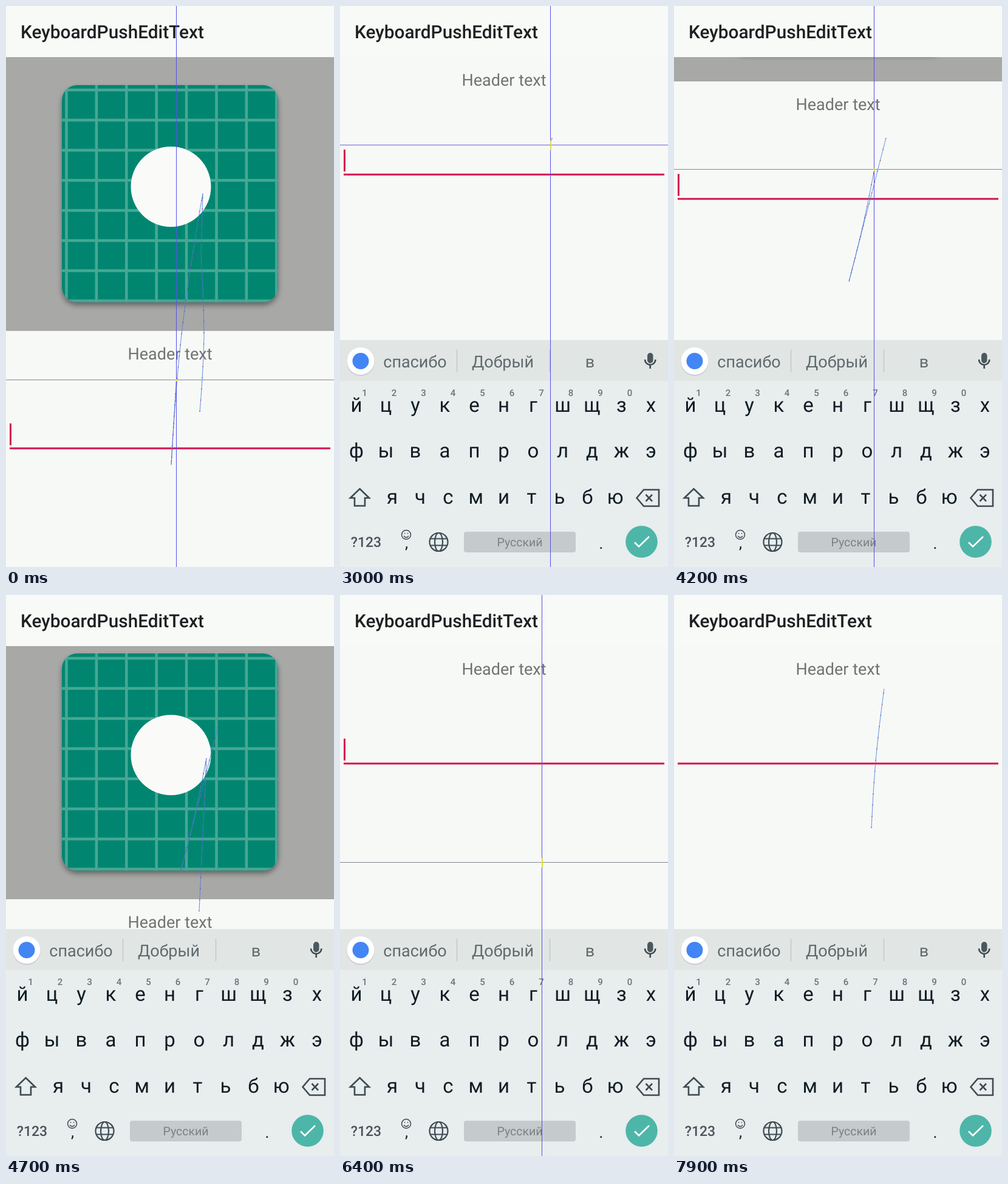
These frames come from a looping animation (540x922 px, 8 s). An HTML page:

```html
<!DOCTYPE html>
<html lang="en">
<head>
<meta charset="utf-8">
<title>Keyboard push demo</title>
<style>
  html, body { margin: 0; width: 100%; height: 100%; overflow: hidden; background: #f7f9f7; }
  svg {
    display: block; width: 100vw; height: 100vh;
    font-family: Roboto, "Noto Sans", sans-serif; text-rendering: geometricPrecision;
  }
  .title { font-size: 29.8px; font-weight: 500; fill: #1e2021; }
  .header { font-size: 27px; fill: #717372; }
  .mid { text-anchor: middle; }
  .hint { font-size: 27px; fill: #616a6c; }
  .key { font-size: 33px; fill: #101d24; }
  .small { font-size: 26px; }
  .digit { font-size: 15px; font-weight: 500; fill: #697476; }
  .icon { fill: none; stroke: #3d4b52; stroke-width: 2.6; }
  .trail { fill: none; stroke: #4a7ee0; stroke-width: 1; stroke-opacity: .85; }
  .dots { fill: none; stroke: #a0285c; stroke-width: 1.2; stroke-dasharray: 1.5 17; }
  .cross { stroke-width: 1; shape-rendering: crispEdges; }
</style>
</head>
<body>
<svg viewBox="0 0 540 922" preserveAspectRatio="none">
  <defs>
    <filter id="shade" x="-10%" y="-10%" width="120%" height="120%">
      <feGaussianBlur stdDeviation=".7" result="soft"/>
      <feDropShadow in="soft" dx="0" dy="5" stdDeviation="4" flood-color="#000" flood-opacity=".4"/>
    </filter>
    <clipPath id="tile"><rect x="92" y="130" width="356" height="357" rx="25"/></clipPath>
  </defs>
  <rect width="540" height="922" fill="#f7f9f7"/>

  <g id="content">
    <rect y="84" width="540" height="450" fill="#a8a8a7"/>
    <g filter="url(#shade)">
      <g clip-path="url(#tile)">
        <rect x="92" y="130" width="356" height="357" fill="#02866f"/>
        <path id="grid" stroke="#fff" stroke-opacity=".27" stroke-width="4.500"/>
      </g>
    </g>
    <circle cx="271.500" cy="297" r="66" fill="#fafbf9"/>
    <text class="header mid" x="270" y="581">Header text</text>
    <rect x="6" y="725.500" width="528" height="3" fill="#d3144f"/>
    <rect id="caret" x="6" y="686" width="3" height="36" fill="#d3144f"/>
  </g>

  <rect width="540" height="84" fill="#f8faf8"/>
  <text class="title" x="24" y="53">KeyboardPushEditText</text>

  <g id="keyboard">
    <rect y="549" width="540" height="373" fill="#e8edee"/>
    <rect y="549" width="540" height="67" fill="#e1e6e5"/>
    <circle cx="34" cy="585" r="23" fill="#c9cfcf"/>
    <circle cx="34" cy="583.500" r="22.500" fill="#fff"/>
    <circle cx="34" cy="583.500" r="13.500" fill="#4285f4"/>
    <path d="M192.500 565v37M345.500 565v37" stroke="#c3c9c9" stroke-width="1.500"/>
    <g class="hint mid">
      <text x="123.500" y="594">спасибо</text>
      <text x="268" y="594">Добрый</text>
      <text x="411.500" y="594">в</text>
    </g>
    <rect x="506" y="570" width="9.500" height="17" rx="4.700" fill="#4b585e"/>
    <path class="icon" d="M502 581a8.700 8.700 0 0 0 17.400 0M510.700 590v6"/>
    <g id="keys"></g>
    <path class="icon" d="M32.500 793.500 48 808.500H41V821.500H24V808.500H17Z"/>
    <path class="icon" d="M500 795H525V822H500L488.500 808.500ZM503.500 803l10.500 11m0-11l-10.500 11"/>
    <text class="mid" x="43" y="889" font-size="23" font-weight="500" fill="#47545a">?123</text>
    <text class="key small mid" x="109.500" y="891">,</text>
    <g class="icon" style="stroke-width:1.500">
      <circle cx="109" cy="869" r="7.500"/>
      <path d="M105 871q4 5 8 0M106.500 866v1.500M111.500 866v1.500"/>
    </g>
    <g class="icon" style="stroke-width:2.200">
      <circle cx="162.500" cy="881" r="15"/>
      <ellipse cx="162.500" cy="881" rx="6.500" ry="15"/>
      <path d="M149 875.500h27M149 886.500h27"/>
    </g>
    <rect x="204" y="864" width="184" height="34" rx="4" fill="#c5cbcc"/>
    <text class="mid" x="296" y="888" font-size="19.500" fill="#798285">Русский</text>
    <text class="key small mid" x="430" y="892">.</text>
    <circle cx="496.500" cy="880.500" r="26.300" fill="#4db6a8"/>
    <path d="M485 881.500l7 7 17-16.500" fill="none" stroke="#fff" stroke-width="2.600"/>
  </g>

  <path id="trail" class="trail"/>
  <path id="dots" class="dots"/>
  <g id="cross" class="cross">
    <path id="vert" stroke="#5650e8"/>
    <path id="horz"/>
    <path id="speed" stroke="#dbe048" stroke-width="2"/>
  </g>
</svg>

<script>
const $ = id => document.getElementById(id);
const LOOP = 8000, STEP = 100, MAX = 450;
const clamp = (v, lo = 0, hi = 1) => Math.min(hi, Math.max(lo, v));
const lerp = (a, b, k) => a + (b - a) * k;
const swing = u => (1 - Math.cos(Math.PI * u)) / 2;
const flick = u => u * u;
const settle = u => 1 - (1 - u) ** 3;

// Stops are [time, x, y, sideways bow on the way there, easing].
const swipes = [
  [[-940, 319, 667], [-800, 326, 545, 1], [-680, 321, 410, 1], [-540, 324, 308],
   [-141, 272, 754, -8], [259, 311, 249, -3], [620, 260, 745, -16], [980, 293, 266, -2]],
  [[1600, 200, 705], [1690, 200, 706]],
  [[2900, 349, 217], [3620, 288, 453], [4180, 330, 268, 2], [4560, 318, 520, 0, flick]],
  [[5300, 377, 462], [5480, 419, 142, 0, flick]],
  [[6400, 332, 439], [6700, 350, 190, -3, flick]],
  [[7300, 325, 383], [7600, 346, 154, -3]]
];
const [, , pull, push] = swipes;
const endOf = s => s[s.length - 1][0];

function finger(swipe, t) {
  t = clamp(t, swipe[0][0], endOf(swipe));
  const i = Math.max(1, swipe.findIndex(p => p[0] >= t));
  const [t0, x0, y0] = swipe[i - 1];
  const [t1, x1, y1, bow = 0, ease = swing] = swipe[i];
  const e = ease((t - t0) / (t1 - t0));
  return [lerp(x0, x1, e) + bow * Math.sin(Math.PI * e), lerp(y0, y1, e)];
}

// Content follows the finger past the touch slop, then flings to an edge.
function scrollAt(t) {
  if (t < pull[0][0]) return MAX * swing(clamp((t - 2050) / 250));
  if (t < push[0][0]) {
    const dy = finger(pull, t)[1] - pull[0][2] - 12;
    const left = 1 - settle(clamp((t - endOf(pull)) / 350));
    return clamp(MAX - Math.max(0, dy), 0, MAX) * left;
  }
  const moved = Math.max(0, push[0][2] - finger(push, t)[1] - 6);
  return lerp(moved, MAX, settle(clamp((t - endOf(push)) / 300)));
}

function drawTouch(t) {
  const swipe = swipes.filter(s => s[0][0] <= t).pop();
  const start = swipe[0][0], stop = Math.min(t, endOf(swipe));
  const pts = [];
  for (let s = start; s < stop; s += 20) pts.push(finger(swipe, s));
  pts.push(finger(swipe, stop));
  const d = "M" + pts.map(p => p.map(v => v.toFixed(1)).join(" ")).join("L");
  $("trail").setAttribute("d", d);
  $("dots").setAttribute("d", d);

  const down = t <= endOf(swipe), age = t - start;
  $("cross").style.display = down ? "" : "none";
  if (!down) return;
  const [x, y] = finger(swipe, t).map(v => Math.floor(v) + .5);
  const tick = age <= 200 ? 8 : 2;
  $("vert").setAttribute("d", `M${x} 0V922`);
  $("horz").setAttribute("d", `M0 ${y}H540`);
  $("horz").setAttribute("stroke", age > 50 && age <= 200 ? "#6a60e4" : "#85858f");
  $("speed").setAttribute("d", `M${x} ${y - tick}V${y + tick}`);
}

function buildKeys() {
  const text = (cls, x, y, s) => `<text class="${cls} mid" x="${x}" y="${y}">${s}</text>`;
  const row = (letters, x, gap, y) =>
    [...letters].map((c, i) => text("key", x + i * gap, y, c)).join("");
  $("keys").innerHTML =
    row("йцукенгшщзх", 27, 48.5, 667) +
    row("фывапролджэ", 27, 48.5, 742) +
    row("ячсмитьбю", 86, 45.9, 818) +
    [..."1234567890"].map((c, i) => text("digit", 40.5 + i * 48.5, 641, c)).join("");
}

function buildGrid() {
  let d = "";
  for (let i = 0; i < 8; i++) {
    d += `M${99.500 + i * 49.4} 130V487`;
    d += `M92 ${138 + i * 49.5}H448`;
  }
  $("grid").setAttribute("d", d);
}

const born = performance.now();
function frame() {
  const t = Math.floor((performance.now() - born) % LOOP / STEP) * STEP;
  const up = settle(clamp((t - 1950) / 300));
  $("content").setAttribute("transform", `translate(0 ${-Math.round(scrollAt(t))})`);
  $("keyboard").setAttribute("transform", `translate(0 ${(1 - up) * 373})`);
  $("caret").style.display = t % 1000 < 500 ? "" : "none";
  drawTouch(t);
  requestAnimationFrame(frame);
}
buildKeys();
buildGrid();
frame();
</script>
</body>
</html>
```
